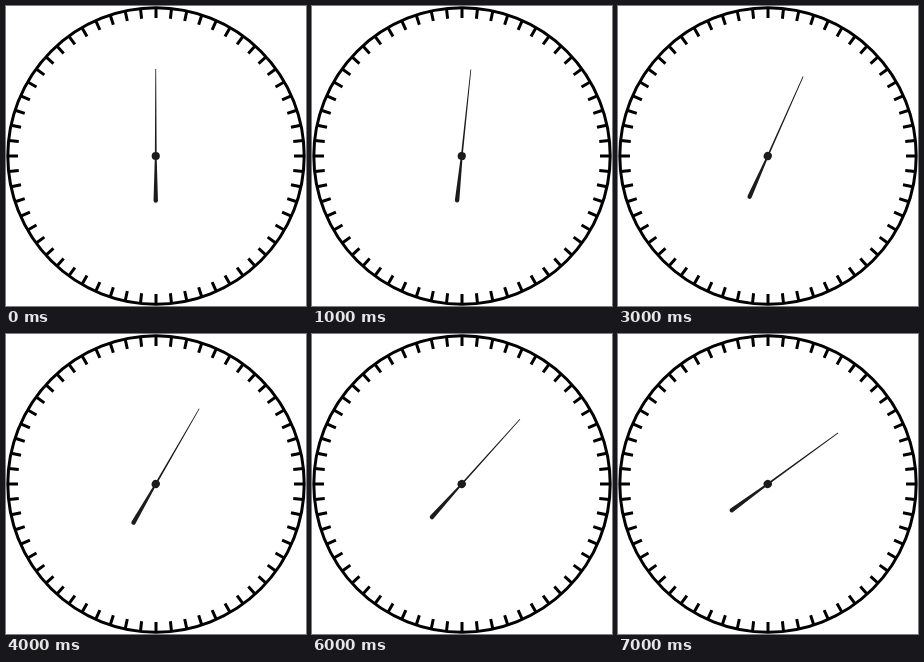
Recreate the animation shown at these times as an HTML page. Size 300 by 300 pixels, loop 8000 ms.

```html
<!DOCTYPE html>
<html lang="en">
<head>
<meta charset="utf-8">
<title>Stopwatch dial</title>
<style>
html, body { margin: 0; width: 100%; height: 100%; overflow: hidden; background: #fff; }
svg { display: block; width: 100vw; height: 100vh; }
</style>
</head>
<body>
<svg viewBox="0 0 300 300">
  <g id="dial" fill="none" stroke="#000" stroke-width="3">
    <circle cx="150" cy="150" r="148.2"/>
    <path id="ticks"/>
  </g>
  <g transform="translate(149.75 150)">
    <g id="hand" fill="#1c1c1c">
      <path d="M-.4 -87H.4L.9 0L2.2 44.5A2.2 2.2 0 0 1 -2.2 44.5L-.9 0Z"/>
      <circle r="4.1"/>
    </g>
  </g>
</svg>
<script>
const LOOP = 8000;
// Degrees held for each second; the hand jumps between them.
const ANGLES = [0, 6, 12, 24, 30, 36, 42, 54];
const ticks = document.getElementById('ticks');
const hand = document.getElementById('hand');

const point = (r, deg) => {
  const a = deg * Math.PI / 180;
  return `${(150 + r * Math.sin(a)).toFixed(2)} ${(150 - r * Math.cos(a)).toFixed(2)}`;
};

ticks.setAttribute('d', Array.from({ length: 60 }, (_, i) =>
  `M${point(138, i * 6)}L${point(148, i * 6)}`).join(''));

const start = performance.now();
function draw() {
  const t = (performance.now() - start) % LOOP;
  hand.setAttribute('transform', `rotate(${ANGLES[Math.floor(t / 1000)]})`);
  requestAnimationFrame(draw);
}
draw();
</script>
</body>
</html>
```
